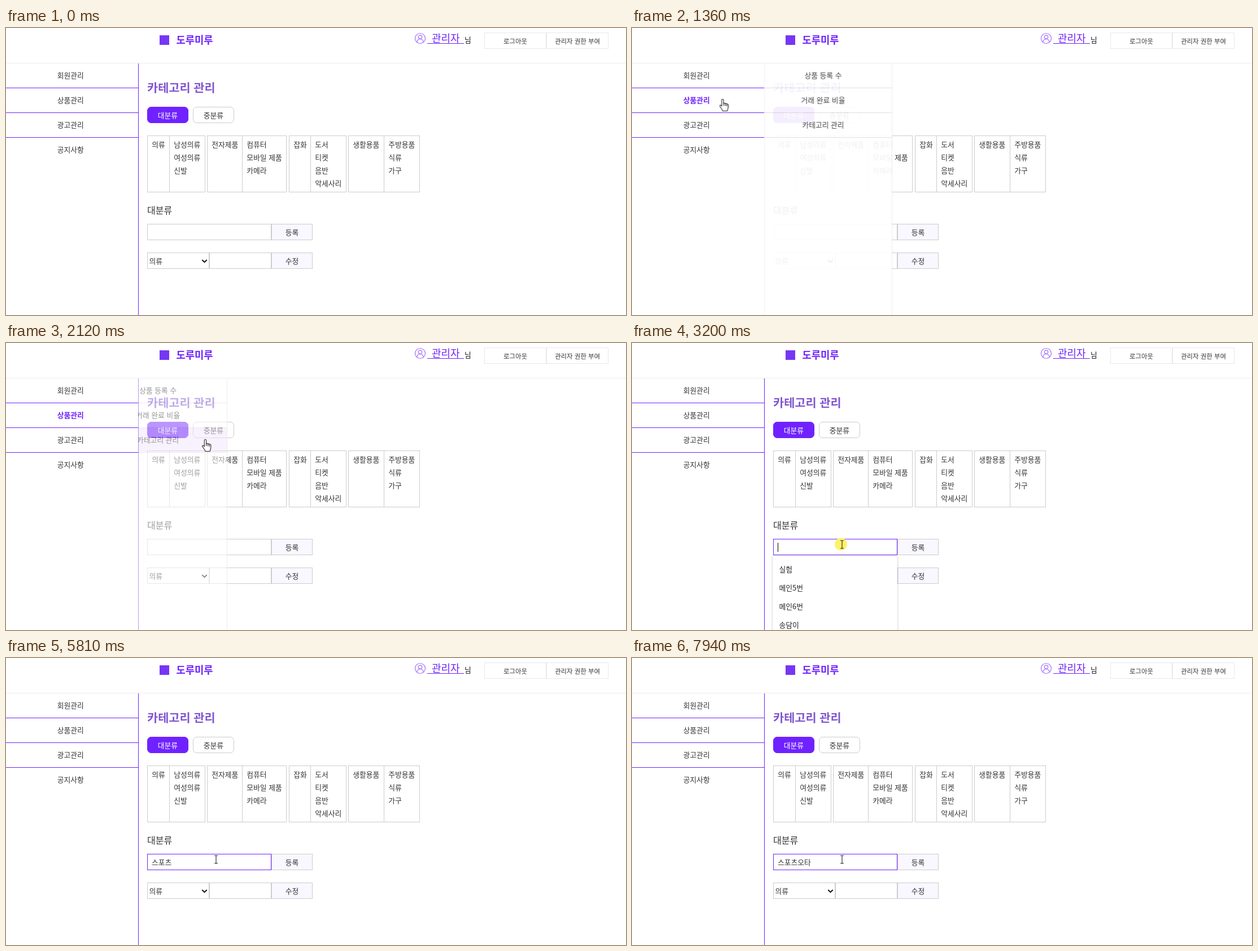
An HTML page for the animation above (8000 ms loop, 1098x510 px).

```html
<!DOCTYPE html>
<html lang="ko">
<head>
<meta charset="utf-8">
<title>카테고리 관리</title>
<style>
  :root { --accent: #6f22ff; --line: #ccc; --loop: 8s; }
  * { box-sizing: border-box; margin: 0; padding: 0; }
  html, body { width: 100%; height: 100%; overflow: hidden; background: #fff; }
  body {
    position: relative;
    font: 12.8px "Noto Sans CJK KR", "Noto Sans CJK JP", "Noto Sans", sans-serif;
    color: #333;
    white-space: nowrap;
  }
  .abs, .box, .tab, .cat { position: absolute; }
  .box, .tab {
    display: flex; align-items: center; justify-content: center;
    height: 29px; border: 1px solid var(--line); background: #fff;
  }

  /* header */
  header { position: absolute; width: 1098px; height: 63px; border-bottom: 1px solid #eee; }
  .mark { left: 272px; top: 13px; width: 17px; height: 17px; background: #7636f5; }
  .brand { left: 301.5px; top: 8px; font-size: 17.7px; line-height: 24px; font-weight: 900; color: var(--accent); }
  .user {
    left: 746px; top: 6px; width: 65px; height: 22px; padding-left: 8px;
    font-size: 18px; line-height: 22px; color: var(--accent); border-bottom: 1px solid;
  }
  .link { top: 8px; width: 110px; font-size: 11.4px; border-color: #e8e8e8; }

  /* sidebar */
  .side { position: absolute; top: 63px; width: 235px; list-style: none; }
  .side li { height: 44px; padding-left: 90.7px; line-height: 41px; border-bottom: 1px solid var(--accent); }
  .side li:last-child { border: 0; }
  .hovered { animation: hovered var(--loop) step-end infinite; }
  .rule { left: 234px; top: 63px; width: 1px; height: 447px; background: var(--accent); }

  /* content */
  h1 { left: 250px; top: 91px; font-size: 20.8px; line-height: 28px; color: #8055d0; }
  h2 { left: 250px; top: 312px; font-size: 16px; line-height: 22px; font-weight: 400; }
  .tab { top: 140px; width: 73px; border-radius: 7px; }
  .tab.on { background: var(--accent); border-color: var(--accent); color: #fff; }
  .cat { left: var(--x); top: 191px; width: var(--w); height: 101px; display: flex; border: 1px solid var(--line); }
  .cat p { padding: 3px 0 0 7.3px; line-height: 23px; }
  .cat p:first-child { flex: 0 0 var(--a); }
  .cat p + p { flex: 1; border-left: 1px solid var(--line); }
  .btn { left: 470px; width: 73px; background: #f9f7ff; }
  .field { justify-content: flex-start; }
  .name { left: 250px; top: 348px; width: 220px; padding-left: 7px; animation: focus var(--loop) step-end infinite; }
  .name::before { content: ""; animation: type var(--loop) step-end infinite; }
  .caret { position: relative; top: .5px; width: 1px; height: 16px; background: #000; animation: blink var(--loop) step-end infinite; }

  /* sliding submenu */
  .clip { left: 234px; top: 63px; width: 246px; height: 447px; overflow: hidden; }
  .panel {
    width: 245px; height: 447px; list-style: none; text-align: center;
    background: #fff; border-right: 1px solid #d8d8d8;
    animation: slide var(--loop) infinite, fade var(--loop) infinite;
  }
  .panel li { height: 44px; line-height: 41px; border-bottom: 1px solid #ddd; }
  .panel .pick { animation: pick var(--loop) step-end infinite; }

  /* suggestions */
  .suggest {
    left: 249px; top: 379px; width: 221px; height: 150px; padding-top: 6px; list-style: none;
    background: #fff; color: #222; box-shadow: 0 0 3px rgba(0, 0, 0, .3);
    animation: suggest var(--loop) linear infinite;
  }
  .suggest li { padding-left: 11.5px; line-height: 33px; }

  /* pointer */
  .over { position: absolute; left: 0; top: 0; }
  .cursor { animation: move var(--loop) infinite; }
  .cursor > g { opacity: 0; animation: var(--loop) step-end infinite; }
  .cursor .arrow { animation-name: arrow; }
  .cursor .hand { animation-name: hand; }
  .cursor .beam { animation-name: beam; }
  .click { opacity: 0; animation: click var(--loop) step-end infinite; }

  @keyframes move {
    0%, 1.7% { transform: translate(1030px, 484px); animation-timing-function: ease-in-out; }
    11%, 18.8% { transform: translate(160.5px, 126px); animation-timing-function: ease-in-out; }
    23.7%, 27% { transform: translate(353px, 171px); animation-timing-function: ease-in-out; }
    31.8%, 100% { transform: translate(372px, 358px); }
  }
  @keyframes arrow { 0% { opacity: 0 } 1.7% { opacity: 1 } 9.2% { opacity: 0 } 28.2% { opacity: 1 } 31% { opacity: 0 } }
  @keyframes hand { 0% { opacity: 0 } 9.2% { opacity: 1 } 28.2% { opacity: 0 } }
  @keyframes beam { 0% { opacity: 0 } 31%, 100% { opacity: 1 } }
  @keyframes click { 0% { opacity: 0 } 39.9% { opacity: 1 } 40.8% { opacity: 0 } }

  @keyframes hovered {
    0% { font-weight: 400; color: #333; }
    9.2% { font-weight: 700; color: #6f22ff; }
    28.2%, 100% { font-weight: 400; color: #333; }
  }
  @keyframes pick { 0% { background: #fff } 21.5% { background: #f0e6fb } 28.2%, 100% { background: #fff } }
  @keyframes slide {
    0%, 12.8% { transform: translateX(-245px); }
    19.05%, 25.1% { transform: none; }
    31.35%, 100% { transform: translateX(-245px); }
  }
  @keyframes fade {
    0%, 12.8% { opacity: 0; }
    19.05%, 24.75% { opacity: 1; }
    31%, 100% { opacity: 0; }
  }
  @keyframes focus { 0% { border-color: #ccc } 39.9%, 100% { border-color: #6f22ff } }
  @keyframes suggest {
    0%, 39.89% { opacity: 0; }
    39.9%, 50.5% { opacity: 1; }
    55.2%, 100% { opacity: 0; }
  }
  @keyframes blink {
    0% { opacity: 0 } 39.9% { opacity: 1 } 46.5% { opacity: 0 }
    49.9% { opacity: 1 } 72.5% { opacity: 0 } 79.2% { opacity: 1 }
    87.5% { opacity: 0 } 91.6% { opacity: 1 } 99.2%, 100% { opacity: 0 }
  }
  /* syllables as the input method composes them */
  @keyframes type {
    0% { content: "" }
    49.9% { content: "ㅅ" }
    51.6% { content: "스" }
    57.7% { content: "슾" }
    59.3% { content: "스포" }
    64.3% { content: "스퐃" }
    65.9% { content: "스포츠" }
    80% { content: "스포층" }
    80.9% { content: "스포츠오" }
    91.6% { content: "스포츠옽" }
    92.5%, 100% { content: "스포츠오타" }
  }
</style>
</head>
<body>
  <header>
    <i class="abs mark"></i>
    <b class="abs brand">도루미루</b>
    <svg class="abs" style="left:723px;top:8px" width="21" height="21" fill="none" stroke="#a06cff" stroke-width="1.2">
      <circle cx="10.5" cy="10.5" r="9"/>
      <circle cx="10.5" cy="8" r="3.2"/>
      <path d="M4.8 17c.6-7 10.8-7 11.4 0"/>
    </svg>
    <span class="abs user">관리자</span>
    <span class="abs" style="left:812px;top:11px;line-height:19px;color:#111">님</span>
    <span class="box link" style="left:847px">로그아웃</span>
    <span class="box link" style="left:957px">관리자 권한 부여</span>
  </header>

  <ul class="side">
    <li>회원관리</li>
    <li class="hovered">상품관리</li>
    <li>광고관리</li>
    <li>공지사항</li>
  </ul>
  <i class="abs rule"></i>

  <main>
    <h1 class="abs">카테고리 관리</h1>
    <span class="tab on" style="left:250px">대분류</span>
    <span class="tab" style="left:331px">중분류</span>

    <div class="cat" style="--x:250px;--w:103px;--a:38px"><p>의류</p><p>남성의류<br>여성의류<br>신발</p></div>
    <div class="cat" style="--x:356px;--w:141px;--a:61px"><p>전자제품</p><p>컴퓨터<br>모바일 제품<br>카메라</p></div>
    <div class="cat" style="--x:501px;--w:102px;--a:37px"><p>잡화</p><p>도서<br>티켓<br>음반<br>악세사리</p></div>
    <div class="cat" style="--x:606px;--w:127px;--a:62px"><p>생활용품</p><p>주방용품<br>식류<br>가구</p></div>

    <h2 class="abs">대분류</h2>
    <div class="box field name"><i class="caret"></i></div>
    <span class="box btn" style="top:348px">등록</span>

    <div class="box field" style="left:250px;top:399px;width:110px;padding-left:2.5px">의류
      <svg class="abs" style="left:95px;top:10px" width="11" height="9" fill="none" stroke="#111" stroke-width="2">
        <path d="M1.3 2l4.2 4.2L9.7 2"/>
      </svg>
    </div>
    <div class="box" style="left:360px;top:399px;width:110px"></div>
    <span class="box btn" style="top:399px">수정</span>
  </main>

  <div class="abs clip">
    <ul class="panel">
      <li>상품 등록 수</li>
      <li>거래 완료 비율</li>
      <li class="pick">카테고리 관리</li>
    </ul>
  </div>

  <ul class="abs suggest">
    <li>실험</li>
    <li>메인5번</li>
    <li>메인6번</li>
    <li>송담이</li>
  </ul>

  <svg class="over" width="1098" height="510">
    <circle class="click" cx="370" cy="357.5" r="11" fill="#fdf26a"/>
    <g class="cursor" fill="#fff" stroke="#222" stroke-width="1.1" stroke-linejoin="round">
      <g class="arrow"><path d="M0 0V16l3.7-3.5 2.4 5.6 2.4-1-2.4-5.5H11z"/></g>
      <g class="hand">
        <path d="M-1.7 13V2.2a1.7 1.7 0 0 1 3.4 0V8.3a1.6 1.6 0 0 1 3 .4 1.5 1.5 0 0 1 2.7.7 1.4 1.4 0 0 1 2.4 1V15c0 2.6-1.4 3.4-1.6 6.5H0C-.6 18.5-3 16.5-5 13.2c-1.1-1.8 1-2.9 2.2-1.6z"/>
        <path fill="none" d="M1.7 8v4M4.7 9v3.5M7.4 10v3"/>
      </g>
      <g class="beam">
        <path fill="none" d="M-3-7h2q1 0 1 1V6q0 1-1 1h-2M3-7H1q-1 0-1 1M3 7H1Q0 7 0 6"/>
      </g>
    </g>
  </svg>
</body>
</html>
```
